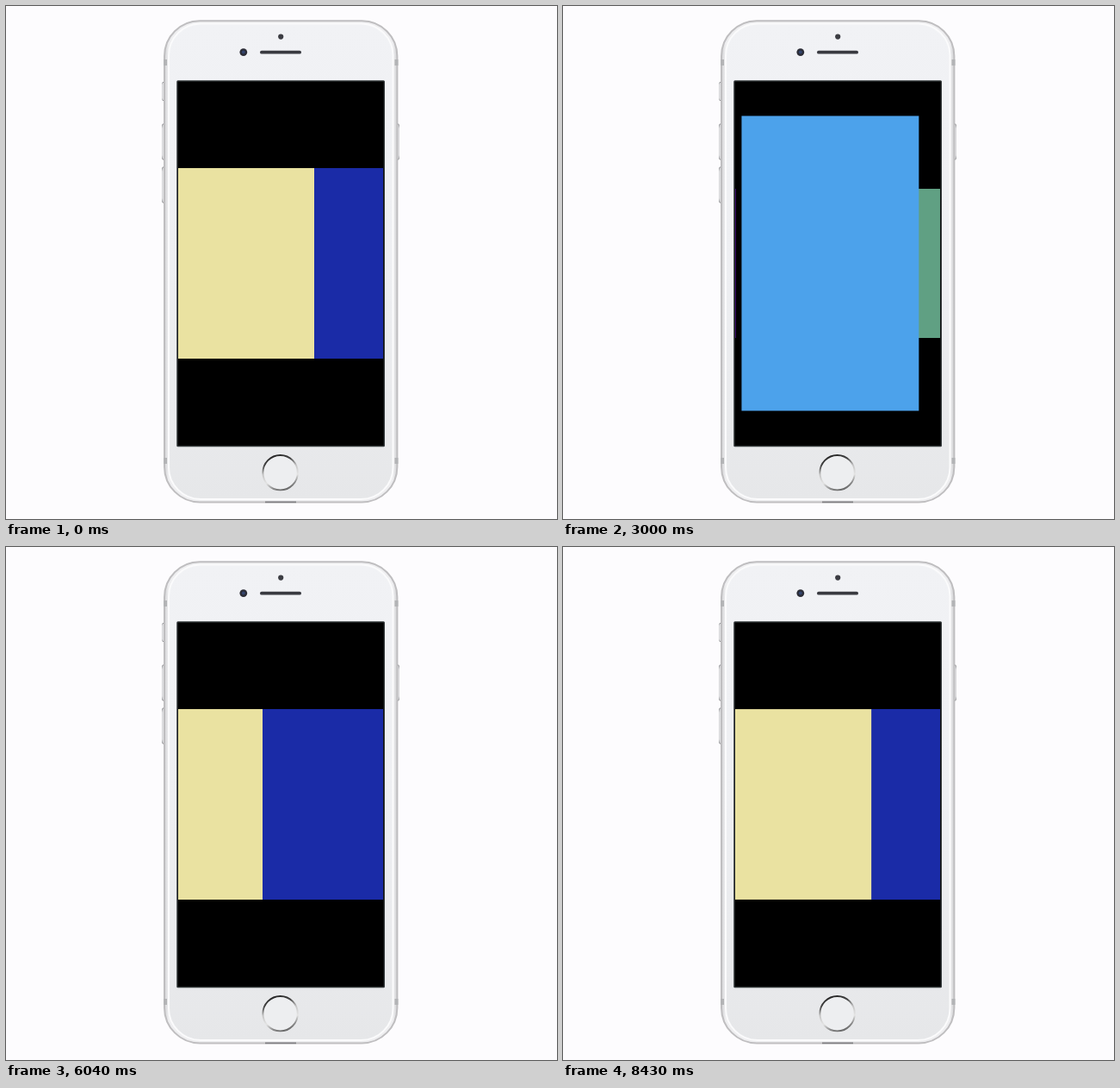
These frames come from a looping animation (640 px wide and 595 px high, 8470 ms). An HTML page with a canvas:

```html
<!DOCTYPE html>
<html lang="en">
<head>
<meta charset="utf-8">
<title>Card carousel</title>
<style>
  html, body { margin: 0; width: 100%; height: 100%; overflow: hidden; background: #fdfcfe; }
  svg, canvas { position: absolute; left: 0; top: 0; display: block; }
</style>
</head>
<body>
<svg width="640" height="595" viewBox="0 0 640 595">
  <defs>
    <linearGradient id="face" x2="0" y2="1">
      <stop offset="0" stop-color="#f1f2f5"/>
      <stop offset=".5" stop-color="#eeeff2"/>
      <stop offset="1" stop-color="#e6e7e9"/>
    </linearGradient>
    <linearGradient id="rim" x2="1" y2="0">
      <stop offset="0" stop-color="#d2d2d4"/>
      <stop offset=".018" stop-color="#eeeef0"/>
      <stop offset=".982" stop-color="#eeeef0"/>
      <stop offset="1" stop-color="#d2d2d4"/>
    </linearGradient>
    <linearGradient id="ring" x1=".35" y1="0" x2=".65" y2="1">
      <stop offset="0" stop-color="#262626"/>
      <stop offset=".2" stop-color="#444"/>
      <stop offset=".42" stop-color="#c4c4c4"/>
      <stop offset=".68" stop-color="#e4e4e4"/>
      <stop offset=".86" stop-color="#8c8c8c"/>
      <stop offset="1" stop-color="#666"/>
    </linearGradient>
    <linearGradient id="key" x2="0" y2="1">
      <stop offset="0" stop-color="#77777a"/>
      <stop offset=".12" stop-color="#cfcfd1"/>
      <stop offset=".88" stop-color="#cfcfd1"/>
      <stop offset="1" stop-color="#77777a"/>
    </linearGradient>
  </defs>
  <g fill="#ececee" stroke="url(#key)" stroke-width="1">
    <rect x="181.7" y="88.5" width="4" height="21" rx="1"/>
    <rect x="181.7" y="137" width="4" height="41" rx="1"/>
    <rect x="181.7" y="187" width="4" height="41" rx="1"/>
    <rect x="452.3" y="137" width="4" height="41" rx="1"/>
  </g>
  <rect x="184" y="17.2" width="270.4" height="558.2" rx="41" fill="url(#rim)" stroke="#bfbec0" stroke-width="2"/>
  <g fill="#b3b4b6">
    <rect x="183" y="62" width="4" height="7"/>
    <rect x="451.5" y="62" width="4" height="7"/>
    <rect x="183" y="524" width="4" height="7"/>
    <rect x="451.5" y="524" width="4" height="7"/>
  </g>
  <rect x="189" y="20.5" width="260.5" height="551.5" rx="37" fill="url(#face)" stroke="#fbfbfc" stroke-width="2"/>
  <rect x="301" y="574.6" width="36" height="1.6" fill="#7c7c7f"/>
  <circle cx="319.2" cy="35.6" r="3.1" fill="#3c3d43"/>
  <circle cx="275.8" cy="53.6" r="4.4" fill="#2c2d37"/>
  <circle cx="275.8" cy="53.6" r="2" fill="#34456d"/>
  <rect x="295" y="51.7" width="48" height="3.9" rx="1.95" fill="#393a40"/>
  <circle cx="318.6" cy="541.2" r="20.2" fill="#edeef0" stroke="url(#ring)" stroke-width="1.9"/>
  <rect x="198.2" y="86.2" width="241.8" height="425" rx="1.5" fill="#33383a"/>
  <rect x="199.6" y="87.6" width="239" height="422.2" fill="#000"/>
</svg>
<canvas id="stage" width="640" height="595"></canvas>
<script>
  const LOOP = 8470;
  const SCREEN = { x: 200, y: 87.5, w: 238, h: 422 };
  const FULL = { x: 200.6, w: 237.8, h: 423 };
  const CARD = { w: 158, h: 220.5 };
  const MID_Y = 298.5;
  const COLORS = ['#eae2a1', '#1a2ba7', '#d9705c', '#3f9a63', '#c884c9', '#5809a9', '#4ca2eb', '#99ffd1'];

  const smooth = u => u * u * (3 - 2 * u);
  const out = k => u => 1 - Math.pow(1 - u, k);

  // start, end, from, to, easing
  const SCROLL = [
    [40, 1560, 0, 1037, out(1.7)],
    [1560, 1900, 1037, 1026, smooth],
    [1900, 2690, 1026, 930.3, smooth],
    [4830, 6520, 930.3, 0, out(2.178)]
  ];
  const ZOOMS = [
    { card: 6, open: 2763, close: 3645 },
    { card: 0, open: 6617, close: 7425 }
  ];

  // springs from 0 to 1: one without overshoot, one with a little
  function firm(ms) {
    const a = Math.max(0, ms) * 0.0085;
    return 1 - (1 + a) * Math.exp(-a);
  }
  function bouncy(ms) {
    const a = Math.max(0, ms) * 0.005;
    return 1 - (Math.cos(a) + Math.sin(a)) * Math.exp(-a);
  }

  function scrollAt(t) {
    let pos = 0;
    for (const [start, end, from, to, ease] of SCROLL) {
      if (t < start) break;
      pos = from + (to - from) * ease(Math.min(1, (t - start) / (end - start)));
    }
    return pos;
  }

  function zoomAt(t) {
    const z = ZOOMS.find(z => t >= z.open && t < z.close + 1050);
    if (!z) return { card: -1, p: 0, dim: 0 };
    const opened = firm(t - z.open);
    return {
      card: z.card,
      p: opened * (1 - firm(t - z.close)),
      dim: opened * (1 - bouncy(t - z.close))
    };
  }

  const ctx = document.getElementById('stage').getContext('2d');

  function box(l, t, r, b, color) {
    ctx.fillStyle = color;
    ctx.fillRect(l, t, r - l, b - t);
  }

  function draw(t) {
    const scroll = scrollAt(t);
    const zoom = zoomAt(t);
    const left = i => SCREEN.x + i * CARD.w - scroll;
    const mix = (a, b) => a + (b - a) * zoom.p;

    ctx.clearRect(0, 0, 640, 595);
    ctx.save();
    ctx.beginPath();
    ctx.rect(SCREEN.x, SCREEN.y, SCREEN.w, SCREEN.h);
    ctx.clip();

    const scale = 1 - 0.36 * zoom.dim;
    const w = CARD.w * scale / 2, h = CARD.h * scale / 2;
    ctx.globalAlpha = Math.min(1, 1 - 0.62 * zoom.dim);
    COLORS.forEach((color, i) => {
      if (i === zoom.card) return;
      const cx = left(i) + CARD.w / 2;
      box(Math.round(cx - w), Math.round(MID_Y - h), Math.round(cx + w), Math.round(MID_Y + h), color);
    });

    ctx.globalAlpha = 1;
    if (zoom.card >= 0) {
      const x = left(zoom.card), half = mix(CARD.h, FULL.h) / 2;
      box(mix(x, FULL.x), MID_Y - half,
          mix(x + CARD.w, FULL.x + FULL.w), MID_Y + half, COLORS[zoom.card]);
    }
    ctx.restore();
  }

  const begin = performance.now();
  function tick() {
    draw((performance.now() - begin) % LOOP);
    requestAnimationFrame(tick);
  }
  tick();
</script>
</body>
</html>
```
